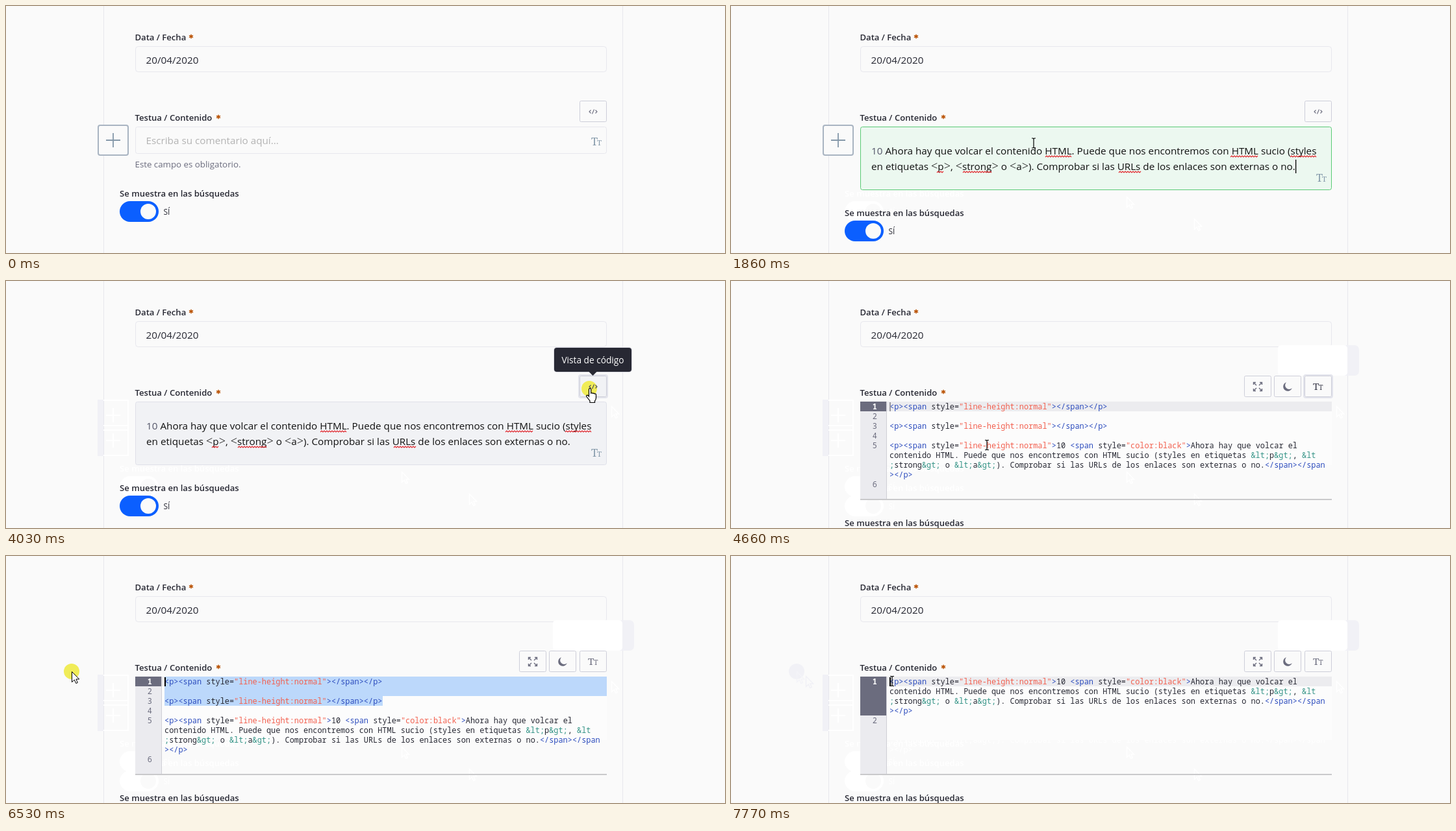
Write an HTML page that moves like this. It is 1107 px wide and 381 px high and loops after 8000 ms.

```html
<!DOCTYPE html>
<html lang="es">
<head>
<meta charset="utf-8">
<title>Formulario</title>
<style>
html, body { margin: 0; width: 100%; height: 100%; overflow: hidden; background: #fafafa; }
svg { display: block; width: 1107px; height: 381px; }
text { white-space: pre; font: 15.25px "Open Sans", sans-serif; fill: #272833; }
.label { font-size: 13.1px; font-weight: 600; }
.small { font-size: 13.3px; fill: #6b6c7e; }
.on { font-size: 12px; }
.tip { font-size: 13.7px; fill: #fff; text-anchor: middle; }
.hint { fill: #b3b3b3; }
.body { fill: #111; }
.wide { font-size: 18px; font-weight: 300; }
.code { font: 11.9px "Noto Sans Mono", monospace; }
.num { fill: #6b6c7e; text-anchor: end; }
.active { fill: #fff; font-weight: 700; }
.tag { fill: #2b4bbd; }
.str { fill: #f2604f; }
.ent { fill: #359487; }
.serif { font-family: "Noto Serif", serif; }
.ghost text, .ghost tspan { fill: #fff; }
</style>
</head>
<body>
<svg id="stage" viewBox="0 0 1107 381"></svg>
<script>
const LOOP = 8000, EDGE = '#e7e7ed', PALE = '#f1f1f6';
const layers = [];
const show = (from, to, ...parts) => layers.push({ from, to, markup: parts.join('') });

// Basic shapes
const text = (x, y, s, cls = '', extra = '') => `<text x="${x}" y="${y}" class="${cls}" ${extra}>${s}</text>`;
const rect = (x, y, w, h, fill, stroke = 'none', r = 0, sw = 1) =>
  `<rect x="${x}" y="${y}" width="${w}" height="${h}" rx="${r}" fill="${fill}" stroke="${stroke}" stroke-width="${sw}"/>`;
const path = (d, stroke, fill = 'none', sw = 1, x = 0, y = 0) =>
  `<path d="${d}" transform="translate(${x} ${y})" stroke="${stroke}" fill="${fill}" stroke-width="${sw}"/>`;
const disc = (x, y, r, fill) => `<circle cx="${x}" cy="${y}" r="${r}" fill="${fill}"/>`;

// Pointers
const ARROW = 'M.5.5V16.5L4.3 13 6.8 18.5 9.3 17.4 6.9 12H11.7Z';
const HAND = 'M4.5 13V2.2a1.6 1.6 0 0 1 3.2 0V8q1.5-.9 2.8.4 1.5-.7 2.6.6 2.2-.6 2.4 1.6V15q0 3-2 5V22.5H6V20L1 13.5Q0 11.5 2 11.2 3.3 11.3 4.5 13Z';
const arrow = (x, y) => path(ARROW, '#000', '#fff', 1, x, y);
const arrowGhost = (x, y, color = '#fff') => path(ARROW, color, 'none', 1.5, x, y);
const beam = (x, y) => path('M-3-7.5H-1L0-6.5 1-7.5H3M0-7V7M-3 7.5H-1L0 6.5 1 7.5H3', '#000', 'none', 1.2, x, y);
const hand = () => path(HAND, '#000', '#fff', 1.2, 893, 165);
const click = (x, y) => disc(x, y, 12, '#f0ec58');

// Form pieces
const star = (x, y) => path('M0-3.3V3.3M-3-1.7 3 1.7M-3 1.7 3-1.7', '#b95000', 'none', 1.5, x, y);
const tt = (x, y, color, k = 1) =>
  text(x - 8, y + 6, 'T', 'serif', `style="font-size:${16.5 * k}px;fill:${color}"`) +
  text(x + 1, y + 6, 'T', 'serif', `style="font-size:${11.5 * k}px;fill:${color}"`);
const button = (x, fill = '#fafafa') => rect(x + .5, 146.5, 41, 32, fill, '#cdced9', 2);
const ring = () => rect(882, 145, 44, 35, 'none', '#e3e4ec', 3, 2);
const codeIcon = (color = '#6b6c7e') =>
  path('M-3.5-2.5-6 0-3.5 2.5M1.5-3.5-1.5 3.5M3.5-2.5 6 0 3.5 2.5', color, 'none', 1.1, 904, 163);
const expandIcon = () => [[-1, -1], [1, -1], [-1, 1], [1, 1]].map(([a, b]) =>
  path(`M${a * 2} ${b * 2}L${a * 6} ${b * 6}M${a * 3} ${b * 6.5}H${a * 6.5}V${b * 3}`, '#6b6c7e', 'none', 1.4, 811, 163)).join('');
const moonIcon = () => path('M-2-6.8A7 7 0 1 0 6.8 2.2 6 6 0 0 1-2-6.8Z', 'none', '#6b6c7e', 1, 857, 163);
const plus = y => rect(142, y + 1, 46, 46, '#fafafa', '#a9b4c2', 3, 2) +
  path('M-11 0H11M0-11V11', '#8598a9', 'none', 1.8, 165, y + 24);
const plusGhost = y => rect(141, y, 9, 48, PALE) +
  path('M150 1H188V47H150M154 24H176M165 13V35', '#fff', 'none', 2, 0, y);
const SEARCH = 'Se muestra en las búsquedas';
const toggle = y => text(175, y, SEARCH, 'label') + rect(175, y + 7, 60, 32, '#0b5fff', 'none', 16) +
  disc(219, y + 23, 12, '#fafafa') + text(242.5, y + 28, 'SÍ', 'on');
const toggleGhost = y => `<g class="ghost">${text(175, y, SEARCH, 'label')}${rect(175, y + 7, 60, 32, '#fff', 'none', 16)}${
  disc(219, y + 23, 12, '#fafafa')}${text(242.5, y + 28, 'SÍ', 'on')}</g>`;
const field = (h, fill, stroke) => rect(199.5, 186.5, 725, h - 1, fill, stroke, 3) + tt(909, 167 + h, '#8398a9');
const caret = (x, y, h = 21, w = 1.3) => rect(x, y, w, h, '#000');
const tooltip = (s, w, color = '#fff') =>
  rect(902.5 - w / 2, 102, w + 2, 39, '#d9d9e0', 'none', 5) +
  rect(903.5 - w / 2, 103, w, 37, '#272833', 'none', 4) +
  path('M-6 0H6L0 6Z', 'none', '#272833', 1, 903.5, 140) + text(903.5, 127, s, 'tip', `style="fill:${color}"`);

// Spell-checked paragraph
const wave = (x, end, y) => {
  let d = `M${x} ${y}`;
  for (let i = 0; x + i * 2 < end; i++) d += `l2 ${i % 2 ? 2 : -2}`;
  return path(d, '#e0262c', 'none', 1.2);
};
const angles = s => s.replace(/[<>]/g, c => `<tspan class="wide">${c === '<' ? '&lt;' : '&gt;'}</tspan>`);
const paragraph = () =>
  text(216, 229, '<tspan fill="#55576a">10</tspan> Ahora hay que volcar el contenido HTML. Puede que nos encontremos con HTML sucio (styles', 'body') +
  text(216, 253, angles('en etiquetas <p>, <strong> o <a>). Comprobar si las URLs de los enlaces son externas o no.'), 'body') +
  wave(484, 524, 233) + wave(769, 811, 233) + wave(861, 900, 233) +
  wave(317, 326, 257) + wave(357, 401, 257) + wave(597, 631, 257);

// Code editor
const esc = s => s.replace(/&/g, '&amp;').replace(/</g, '&lt;');
const paint = s => s.replace(/("[^"]*")|(&\w+;?|^;)|(<\/?\w*|>)/g, (m, str, ent) =>
  `<tspan class="${str ? 'str' : ent ? 'ent' : 'tag'}">${esc(m)}</tspan>`);
const rowTop = n => 186 + 15 * n;
const codeRow = (s, n) => text(244, rowTop(n) + 12, paint(s), 'code');
const SPAN = '<p><span style="line-height:normal">';
const EMPTY = [SPAN + '</span></p>'], BLANK = [''];
const LONG = [
  SPAN + '10 <span style="color:black">Ahora hay que volcar el',
  'contenido HTML. Puede que nos encontremos con HTML sucio (styles en etiquetas &lt;p&gt;, &lt',
  ';strong&gt; o &lt;a&gt;). Comprobar si las URLs de los enlaces son externas o no.</span></span',
  '></p>'];
const editor = (blocks, active = 0, selection = '') => {
  let row = 0, out = rect(240, 186, 685, 98, '#fcfcfc') + rect(199, 186, 40, 151, '#ebebef') +
    rect(239, 186, 1, 151, '#cfcfd6') + rect(240, rowTop(active), 685, 15, '#ececef') + selection;
  blocks.forEach((rows, i) => {
    const on = i === active;
    if (on) out += rect(199, rowTop(row), 40, rows.length * 15, '#6b6c7e');
    out += text(225, rowTop(row) + 12, i + 1, 'code num' + (on ? ' active' : ''));
    rows.forEach(s => out += codeRow(s, row++));
  });
  return out + rect(199, 336, 726, 2, '#c9c9cb');
};
const select = n => rect(244, rowTop(n), n === 2 ? 336 : 681, 15, '#bcd8fb');
const codeCaret = n => caret(244, rowTop(n) + 1, 14, 2);

// Static page
show(0, LOOP,
  rect(150, 0, 1, 381, EDGE), rect(949, 0, 1, 381, EDGE),
  text(198.5, 53, 'Data / Fecha', 'label'), star(285, 47),
  rect(199.5, 62.5, 725, 39, '#fafafa', EDGE, 4), text(215.5, 89, '20/04/2020'),
  text(198.5, 177, 'Testua / Contenido', 'label'), star(327, 171));

// Faint traces left behind
show(610, LOOP, arrowGhost(713, 328));
show(910, LOOP, arrowGhost(609, 294));
show(1860, LOOP, toggleGhost(294));
show(2170, LOOP, plusGhost(183));
show(3100, LOOP, arrowGhost(932, 193));
show(4030, LOOP, plusGhost(222));
show(4340, LOOP, rect(842, 99, 125, 47, PALE, 'none', 7), rect(842, 99, 107, 47, '#fff', 'none', 5), toggleGhost(324));
show(6840, LOOP, disc(101, 178, 12, PALE), arrowGhost(101, 178, '#f4f4f8'),
  `<g class="ghost">${codeRow(LONG[2], 6)}${codeRow(LONG[3], 7)}</g>`);
show(7160, LOOP, arrowGhost(115, 185, PALE));

// Visual field
show(0, 4030, button(883), codeIcon());
show(4030, 4340, ring(), button(883, '#f1f2f5'));
show(0, 1220, field(42, '#fafafa', EDGE), text(215.5, 213, 'Escriba su comentario aquí...', 'hint'));
show(1220, 1860, field(42, '#f0f5ff', '#80acff'), caret(216, 196));
show(0, 1860, text(198.5, 249, 'Este campo es obligatorio.', 'small'), toggle(294));
show(0, 2170, plus(183));
show(2170, 4030, plus(222));
show(1860, 4030, field(98, '#ecf8f0', '#5aca75'));
show(4030, 4340, field(98, '#f1f2f5', '#dfe0e9'));
show(1860, 4340, paragraph(), toggle(324));
show(1860, 2470, caret(869, 237));
show(2790, 3400, caret(869, 237));

// Code view
show(4340, 6210, ring());
show(4340, LOOP, button(790), expandIcon(), button(836), moonIcon(), button(883),
  text(175, 378, SEARCH, 'label'));
show(4340, 6210, tt(904, 162, '#393a4a', .92));
show(6210, LOOP, tt(904, 162, '#6b6c7e', .92));
const FULL = [EMPTY, BLANK, EMPTY, BLANK, LONG, BLANK];
show(4340, 6210, editor(FULL), rect(244.5, 187.5, 1, 13, 'none', '#9a9aa2'));
show(6210, 6530, editor(FULL, 1, select(1) + select(2)), codeCaret(1));
show(6530, 6840, editor(FULL, 0, select(0) + select(1) + select(2)), codeCaret(0));
show(6840, 7160, editor([BLANK, BLANK, LONG, BLANK]));
show(7160, 7460, editor([BLANK, LONG, BLANK]));
show(7460, LOOP, editor([LONG, BLANK]));
show(6840, LOOP, codeCaret(0));

show(3100, 3400, tooltip('Vista de código', 119, '#d5d5da'));
show(3400, 4340, tooltip('Vista de código', 119));
show(4340, 4660, tooltip('Vista de texto', 111));

// Pointer: start time and look
const pointer = [
  [290, arrow(713, 328)], [610, arrow(609, 294)], [910, beam(466, 211.5)],
  [2170, beam(505.5, 212)], [2470, beam(768.5, 212)], [2790, arrow(932, 193)],
  [3100, hand()], [4030, click(898, 166) + codeIcon('#4a4b5c') + hand()], [4340, hand()],
  [4660, beam(394, 253)], [4960, beam(468.5, 253)], [5280, beam(578.5, 248)],
  [5590, beam(523.5, 247)], [5910, beam(585.5, 228)],
  [6210, click(330, 204) + beam(330, 204)], [6530, click(101, 178) + arrow(101, 178)],
  [6840, arrow(115, 185)], [7160, arrow(191, 189)],
  [7460, beam(290.5, 203)], [7770, beam(248, 193)]];
pointer.forEach(([from, look], i) => show(from, pointer[i + 1]?.[0] ?? LOOP, look));

const stage = document.getElementById('stage');
stage.innerHTML = layers.map(l => `<g>${l.markup}</g>`).join('');
const groups = [...stage.children];
const start = performance.now();
function frame() {
  const t = (performance.now() - start) % LOOP;
  groups.forEach((g, i) => g.style.display = t >= layers[i].from && t < layers[i].to ? '' : 'none');
  requestAnimationFrame(frame);
}
frame();
</script>
</body>
</html>
```
